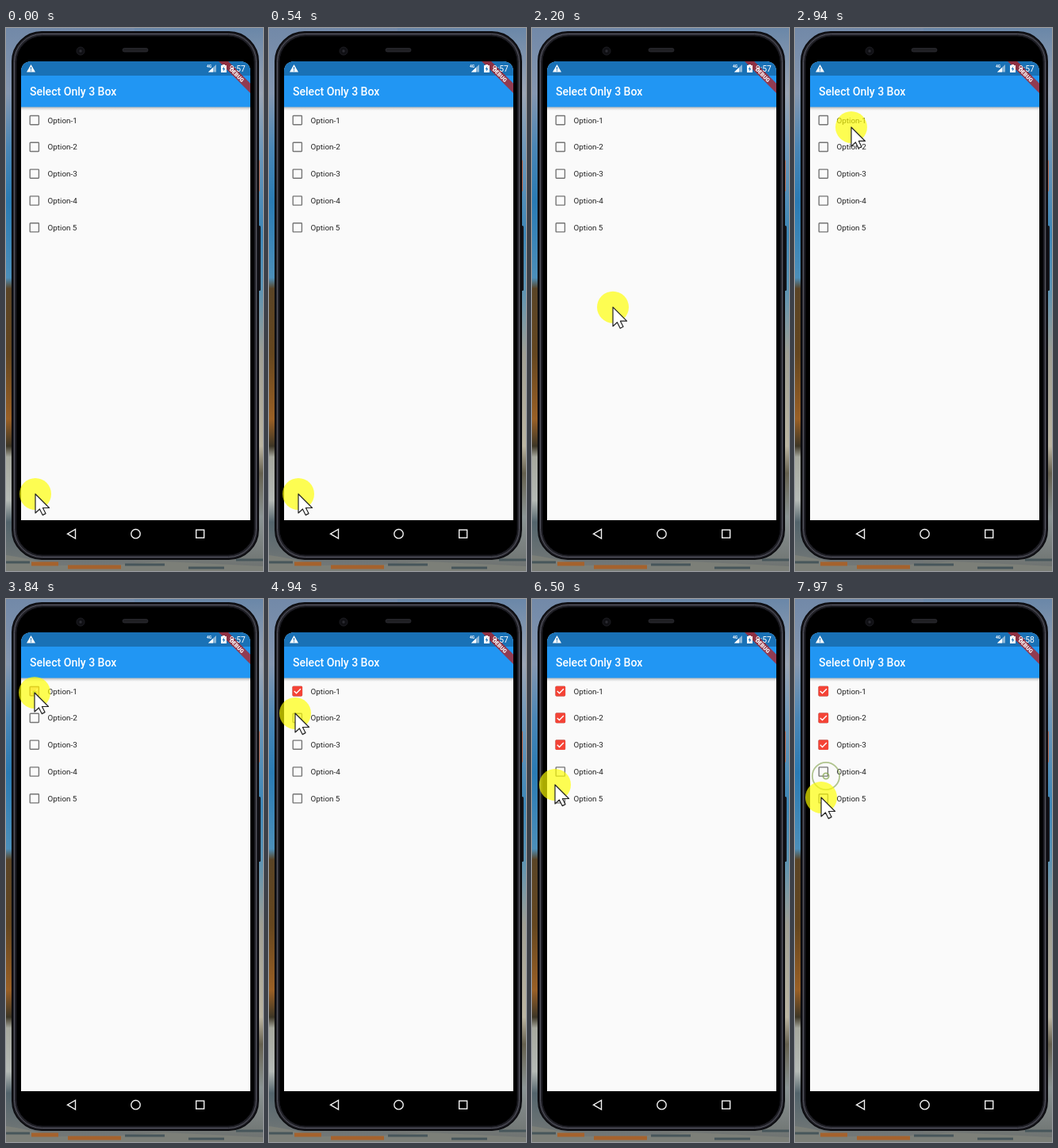
These frames come from a looping animation (324x684 px, 8 s). An HTML page:

```html
<!DOCTYPE html>
<html lang="en">
<head>
<meta charset="utf-8">
<title>Select Only 3 Box</title>
<style>
  html, body { margin: 0; width: 100%; height: 100%; overflow: hidden; background: #000; }
  svg { display: block; width: 324px; height: 684px; }
  text { font-family: Roboto, sans-serif; }
</style>
</head>
<body>
<svg viewBox="0 0 324 684">
  <defs>
    <linearGradient id="left" x2="0" y2="1">
      <stop offset="0" stop-color="#7289a8"/>
      <stop offset=".12" stop-color="#8597b0"/>
      <stop offset=".22" stop-color="#4a86b5"/>
      <stop offset=".32" stop-color="#2a7bb4"/>
      <stop offset=".46" stop-color="#4c8fba"/>
      <stop offset=".48" stop-color="#5a4426"/>
      <stop offset=".6" stop-color="#64461f"/>
      <stop offset=".72" stop-color="#9a6026"/>
      <stop offset=".77" stop-color="#3d3626"/>
      <stop offset=".79" stop-color="#a6a89e"/>
      <stop offset=".87" stop-color="#b5bab6"/>
      <stop offset=".91" stop-color="#53646c"/>
      <stop offset="1" stop-color="#777a78"/>
    </linearGradient>
    <linearGradient id="right" x2="0" y2="1">
      <stop offset="0" stop-color="#6a87a8"/>
      <stop offset=".12" stop-color="#9ba5b4"/>
      <stop offset=".22" stop-color="#6f98b9"/>
      <stop offset=".38" stop-color="#3d86b6"/>
      <stop offset=".48" stop-color="#5c93b3"/>
      <stop offset=".6" stop-color="#a09f94"/>
      <stop offset=".77" stop-color="#bbb5a2"/>
      <stop offset=".82" stop-color="#65604f"/>
      <stop offset=".9" stop-color="#8b9494"/>
      <stop offset="1" stop-color="#6c706e"/>
    </linearGradient>
    <linearGradient id="shadow" x2="0" y2="1">
      <stop offset="0" stop-color="#777" stop-opacity=".55"/>
      <stop offset="1" stop-color="#999" stop-opacity="0"/>
    </linearGradient>
    <clipPath id="screen"><path d="M19 620V56Q19 42 33 42H294Q308 42 308 56V620Z"/></clipPath>
  </defs>

  <!-- Blurred lakeside wallpaper -->
  <rect width="162" height="684" fill="url(#left)"/>
  <rect x="162" width="162" height="684" fill="url(#right)"/>
  <path d="M0 664Q30 668 60 677H130L200 672 324 678V684H0Z" fill="#7c7f78"/>
  <path d="M32 675H66M78 679H145" stroke="#a5622d" stroke-width="5"/>
  <path d="M0 673H30M150 676H200M230 680H275M290 670H324" stroke="#47565b" stroke-width="3"/>

  <!-- Phone -->
  <rect x="316" y="166" width="4" height="40" rx="1.5" fill="#b86b52"/>
  <rect x="316" y="249" width="5" height="82" rx="1.5" fill="#15151a"/>
  <rect x="8" y="5" width="310" height="664" rx="37" fill="#24242a" stroke="#0c0c10" stroke-width="2"/>
  <rect x="10.5" y="7.5" width="305" height="659" rx="35" fill="none" stroke="#565662"/>
  <rect x="13" y="10" width="300" height="654" rx="33" fill="#000" stroke="#121218"/>
  <circle cx="94" cy="29" r="5" fill="#101014" stroke="#1d1d22"/>
  <circle cx="94" cy="29" r="1.7" fill="#2c2c32"/>
  <rect x="147" y="25.5" width="32" height="4.5" rx="2.2" fill="#1f1f23" stroke="#38383e" stroke-width=".6"/>

  <g clip-path="url(#screen)">
    <rect x="19" y="42" width="289" height="578" fill="#fafafa"/>
    <rect x="19" y="99" width="289" height="5" fill="url(#shadow)"/>
    <rect x="19" y="42" width="289" height="57.5" fill="#2196f3"/>
    <rect x="19" y="42" width="289" height="18" fill="#1971b6"/>
    <text x="30" y="84.7" font-size="14.06" font-weight="500" fill="#fff">Select Only 3 Box</text>

    <g transform="translate(308 42) rotate(45)">
      <rect x="-40" y="19.7" width="80" height="8.5" fill="#b71c1c" opacity=".75"/>
      <text y="26.5" font-size="7" font-weight="900" text-anchor="middle" fill="#fff">DEBUG</text>
    </g>
    <g fill="#fff">
      <path d="M31.5 46L37 55.5H26Z"/>
      <path d="M31.5 49V52.4M31.5 53.2V54.4" stroke="#1971b6" stroke-width="1.1"/>
      <text x="253" y="50" font-size="5" font-weight="700">4G</text>
      <path d="M255 55.5L265 46V55.5Z" opacity=".5"/>
      <path d="M255 55.5L261 49.8V55.5Z"/>
      <path d="M271 47H273V46H276V47H278V56H271Z"/>
      <path d="M275.3 48L272.7 52H274.3L273.7 55 276.4 51H274.7Z" fill="#1971b6"/>
      <text id="clock" x="282" y="55" font-size="10.3"></text>
    </g>
    <g id="options"></g>
  </g>

  <g fill="none" stroke="#f4f4f4" stroke-width="1.4">
    <path d="M87.5 631.5V643L77.5 637.2Z"/>
    <circle cx="163.5" cy="637.2" r="5.7"/>
    <rect x="239.7" y="632.2" width="10" height="10"/>
  </g>

  <g id="rings" fill="none" stroke="#86a552" stroke-width="1.8"><circle/><circle/></g>
  <g id="pointer">
    <circle r="20" fill="#ff0" opacity=".67"/>
    <path d="M0 0V24L5.4 19 9.2 26.6 13 24.6 9.4 17.5H17.5Z" fill="#fff" stroke="#222" stroke-width="1.2" stroke-linejoin="round"/>
  </g>
</svg>
<script>
const LOOP = 8000;
const $ = id => document.getElementById(id);

// Pointer stops: time, x, y
const path = [
  [0, 37, 587], [1400, 37, 587], [2200, 102, 352], [2940, 71, 125],
  [3350, 36, 118], [4300, 36, 118], [4900, 33, 144], [5300, 33, 144],
  [5650, 34, 180], [6000, 34, 180], [6450, 29, 234], [6600, 29, 234],
  [6900, 39, 223], [7640, 39, 223], [7950, 33, 250], [LOOP, 33, 250]
];
// The fourth click is refused, so only three boxes become checked.
const clicks = [[3800, 36, 118], [5120, 33, 144], [5820, 34, 180], [7590, 39, 223]];
const labels = ["Option-1", "Option-2", "Option-3", "Option-4", "Option 5"];

$("options").innerHTML = labels.map((label, i) => `
  <g transform="translate(29.5 ${109.8 + i * 33.8})">
    <rect x=".7" y=".7" width="11.2" height="11.2" rx=".7" fill="none" stroke="#757575" stroke-width="1.4"/>
    <g class="check" opacity="0">
      <rect width="12.6" height="12.6" rx="1.4" fill="#f44336"/>
      <path d="M2.3 6.3L5 9 10.4 3.5" fill="none" stroke="#fff" stroke-width="1.4"/>
    </g>
    <text x="23" y="9.9" font-size="9.84" fill="#212121">${label}</text>
  </g>`).join("");

const checks = document.querySelectorAll(".check");
const rings = $("rings").children;
const clamp = v => Math.max(0, Math.min(1, v));

// Monotone cubic interpolation: flows through stops, rests at holds and turns.
function slope(i, axis) {
  const [a, b, c] = [path[i - 1], path[i], path[i + 1]];
  if (!a || !c) return 0;
  const before = (b[axis] - a[axis]) / (b[0] - a[0]);
  const after = (c[axis] - b[axis]) / (c[0] - b[0]);
  return before * after > 0 ? 2 * before * after / (before + after) : 0;
}

function pointerAt(t) {
  const i = path.findIndex(stop => stop[0] > t);
  const a = path[i - 1], b = path[i], span = b[0] - a[0];
  const u = (t - a[0]) / span, v = 1 - u;
  return [1, 2].map(axis =>
    v * v * (1 + 2 * u) * a[axis] + u * u * (3 - 2 * u) * b[axis]
    + span * u * v * (v * slope(i - 1, axis) - u * slope(i, axis)));
}

function draw(t) {
  $("clock").textContent = t < 7000 ? "9:57" : "9:58";
  $("pointer").setAttribute("transform", `translate(${pointerAt(t)})`);

  checks.forEach((check, i) =>
    check.setAttribute("opacity", i < 3 ? clamp((t - clicks[i][0]) / 150) : 0));

  const click = clicks.find(([start]) => t >= start && t < start + 550);
  [...rings].forEach((ring, i) => {
    const age = click ? t - click[0] - i * 300 : -1;
    ring.setAttribute("r", Math.max(0, age * 0.045));
    ring.setAttribute("opacity", age > 0 ? 0.75 * clamp((550 - age) / 200) : 0);
    if (click) {
      ring.setAttribute("cx", click[1]);
      ring.setAttribute("cy", click[2]);
    }
  });
}

const start = performance.now();
function frame() {
  draw((performance.now() - start) % LOOP);
  requestAnimationFrame(frame);
}
frame();
</script>
</body>
</html>
```
